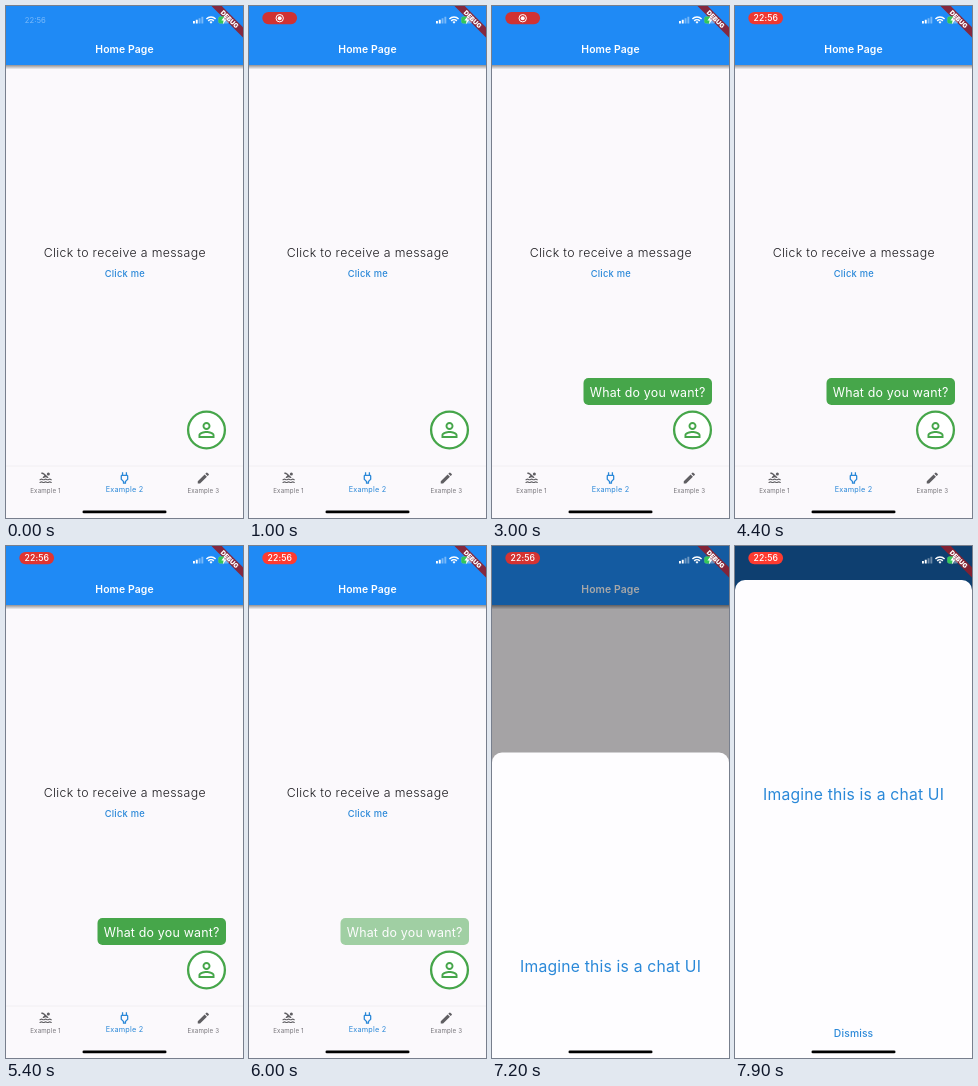
An HTML page for the animation above (8 s loop, 237 by 512 pixels).

```html
<!DOCTYPE html>
<html lang="en">
<head>
<meta charset="utf-8">
<title>Message bubble demo</title>
<style>
  html, body { margin: 0; width: 100%; height: 100%; overflow: hidden; background: #fbf9fc; }
  svg { display: block; width: 100vw; height: 100vh; }
  text { font-family: Inter, "Open Sans", sans-serif; text-anchor: middle; }
</style>
</head>
<body>
<svg viewBox="0 0 237 512">
  <defs>
    <linearGradient id="shade" x2="0" y2="1">
      <stop stop-color="#000" stop-opacity=".42"/>
      <stop offset="1" stop-color="#000" stop-opacity="0"/>
    </linearGradient>
  </defs>
  <rect width="237" height="512" fill="#fbf9fc"/>

  <!-- app bar -->
  <rect y="59" width="237" height="4.5" fill="url(#shade)"/>
  <rect width="237" height="59" fill="#1f8af5"/>
  <text x="118.5" y="47.4" font-size="10.4" font-weight="600" letter-spacing=".1" fill="#fff">Home Page</text>

  <!-- page body -->
  <text x="118.8" y="251.3" font-size="12.3" font-weight="300" letter-spacing=".34" fill="#1c1b1f">Click to receive a message</text>
  <rect id="press" x="93.5" y="258" width="50" height="20" rx="1.5" fill="#d9ebfc"/>
  <text x="118.8" y="271.4" font-size="9.3" font-weight="500" letter-spacing=".25" fill="#2a88d8">Click me</text>

  <g id="bubble">
    <rect x="91.5" y="372" width="128.5" height="27" rx="5" fill="#46a64a"/>
    <text x="155.6" y="390.5" font-size="12.4" letter-spacing=".2" fill="#fff">What do you want?</text>
  </g>
  <circle cx="200.5" cy="424" r="18.4" fill="#fff" stroke="#46a64a" stroke-width="2.3"/>
  <path transform="translate(188.5 412)" fill="#46a64a" d="M12 5.9a2.1 2.1 0 1 1 0 4.2 2.1 2.1 0 0 1 0-4.2m0 9c2.97 0 6.1 1.46 6.1 2.1v1.1H5.9V17c0-.64 3.13-2.1 6.1-2.1M12 4C9.79 4 8 5.79 8 8s1.79 4 4 4 4-1.79 4-4-1.79-4-4-4zm0 9c-2.67 0-8 1.34-8 4v3h16v-3c0-2.66-5.33-4-8-4z"/>

  <!-- bottom navigation -->
  <path d="M0 460h237" stroke="#f1eff2"/>
  <g fill="#5f5e62">
    <g transform="translate(32.3 464.6) scale(.61)">
      <path d="M10 8l-3.25 3.25c.31.12.56.27.77.39.37.23.59.36 1.15.36s.78-.13 1.15-.36c.46-.27 1.08-.64 2.19-.64s1.73.37 2.18.64c.37.22.6.36 1.15.36.55 0 .78-.13 1.15-.36.12-.07.26-.15.41-.23L10.48 5C8.93 3.45 7.5 2.99 5 3v2.5c1.82-.01 2.89.39 4 1.5z"/>
      <circle cx="16.5" cy="5.5" r="2.5"/>
      <path fill="none" stroke="#5f5e62" stroke-width="2" d="M2 15c1.7 0 1.7-1 3.3-1s1.7 1 3.4 1 1.7-1 3.3-1 1.7 1 3.4 1 1.7-1 3.3-1 1.7 1 3.3 1M2 19.5c1.7 0 1.7-1 3.3-1s1.7 1 3.4 1 1.7-1 3.3-1 1.7 1 3.4 1 1.7-1 3.3-1 1.7 1 3.3 1"/>
    </g>
    <path transform="translate(189.9 464.6) scale(.62)" d="M3 17.25V21h3.75L17.81 9.94l-3.75-3.75L3 17.25zM20.71 7.04a1 1 0 0 0 0-1.41l-2.34-2.34a1 1 0 0 0-1.41 0l-1.83 1.83 3.75 3.75z"/>
    <g font-size="6.2" letter-spacing=".15" fill="#77757a">
      <text x="39.5" y="486.9">Example 1</text>
      <text x="197.3" y="486.9">Example 3</text>
    </g>
  </g>
  <g fill="#2a88d8">
    <path transform="translate(110.8 464.3) scale(.64)" d="M16 9v4.66l-3.5 3.51V19h-1v-1.83L8 13.65V9h8m0-6h-2v4h-4V3H8v4h-.01C6.9 6.99 6 7.89 6 8.98v5.52L9.5 18v3h5v-3l3.5-3.51V9c0-1.1-.9-2-2-2V3z"/>
    <text x="118.5" y="486.4" font-size="7.3" letter-spacing=".2">Example 2</text>
  </g>

  <!-- modal sheet -->
  <rect id="scrim" width="237" height="512"/>
  <g id="sheet">
    <path d="M0 512V44a10 10 0 0 1 10-10H227a10 10 0 0 1 10 10V512z" fill="#fefdff"/>
    <g fill="#2a88d8">
      <text x="118.6" y="253.7" font-size="15.7" letter-spacing=".2">Imagine this is a chat UI</text>
      <text x="118.6" y="491" font-size="10.3" font-weight="500" letter-spacing=".15">Dismiss</text>
    </g>
  </g>
  <rect x="76.5" y="504.6" width="84" height="2.7" rx="1.35"/>

  <!-- debug ribbon -->
  <g transform="translate(237) rotate(45)">
    <rect x="-26" y="15" width="52" height="7.3" fill="#8f1f2c" fill-opacity=".9"/>
    <text y="21" font-size="6.4" font-weight="900" fill="#fff">DEBUG</text>
  </g>

  <!-- status bar -->
  <g fill="#fff">
    <path d="M187 15h1.9v2.5H187zM189.8 13.7h1.9v3.8h-1.9z"/>
    <path opacity=".4" d="M192.6 12.2h1.9v5.3h-1.9zM195.4 10.7h1.9v6.8h-1.9z"/>
    <path fill="none" stroke="#fff" stroke-width="1.5" d="M200.4 12.9a6.4 6.4 0 0 1 9.2 0M202.2 14.9a4 4 0 0 1 5.6 0"/>
    <path d="M203.5 16.1a2.1 2.1 0 0 1 3 0L205 17.7z"/>
    <rect x="212.3" y="10.6" width="11" height="7" rx="2" opacity=".35"/>
    <path fill="#34c759" d="M214.3 10.6H218v7h-3.7a2 2 0 0 1-2-2v-3a2 2 0 0 1 2-2z"/>
    <path d="M219 9.8l-3.6 4.8h2.2l-.8 3.8 3.7-4.9h-2.3z"/>
  </g>
  <text id="clock" x="29.3" y="17" font-size="7.7" fill="#fff">22:56</text>
  <g id="pill">
    <rect id="pillBox" x="13.3" y="5.9" width="34.8" height="12.3" rx="6.1"/>
    <g id="record" fill="#fff">
      <circle cx="30.7" cy="12.2" r="3.7" fill="none" stroke="#fff"/>
      <circle cx="30.7" cy="12.2" r="2"/>
    </g>
    <text id="pillTime" x="30.8" y="15.3" font-size="8.7" font-weight="500" letter-spacing=".1" fill="#fff">22:56</text>
  </g>
</svg>
<script>
  const LOOP = 8000;
  const el = id => document.getElementById(id);
  const ramp = (t, start, length) => Math.min(1, Math.max(0, (t - start) / length));
  const fade = (id, value) => el(id).setAttribute('opacity', value);

  function draw(t) {
    fade('clock', 0.4 * (1 - ramp(t, 0, 250)));
    fade('pill', ramp(t, 200, 400));
    const glow = (1 + Math.cos(t * Math.PI / 1000)) / 2;
    const mix = (dark, bright) => dark + (bright - dark) * glow;
    el('pillBox').setAttribute('fill', `rgb(${mix(208, 255)},${mix(50, 59)},${mix(50, 48)})`);
    const toTime = ramp(t, 3600, 300);
    fade('record', 1 - toTime);
    fade('pillTime', toTime);

    fade('press', ramp(t, 1600, 200) - ramp(t, 2000, 300));
    fade('bubble', ramp(t, 1775, 500) - ramp(t, 5750, 500));

    const open = 1 - (1 - ramp(t, 7080, 420)) ** 3;
    fade('scrim', 0.54 * open);
    el('sheet').setAttribute('transform', `translate(0 ${478 * (1 - open)})`);
  }

  function tick() {
    draw(performance.now() % LOOP);
    requestAnimationFrame(tick);
  }
  tick();
</script>
</body>
</html>
```
